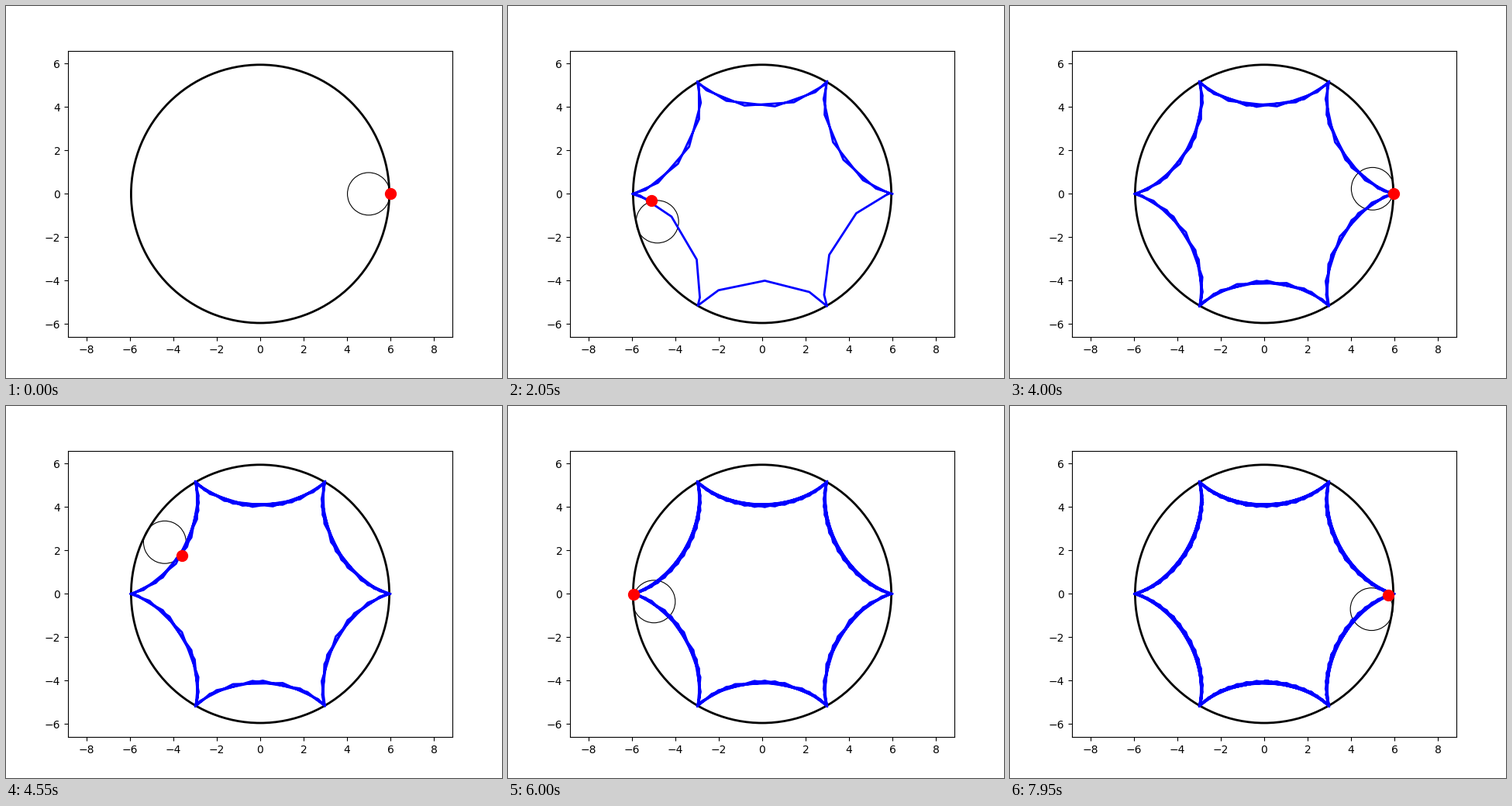
These frames come from a looping animation (640x480 px, 8 s). A matplotlib script:

```python
import numpy as np
import matplotlib.pyplot as plt
from matplotlib.animation import FuncAnimation
from matplotlib.patches import Wedge

R, r = 6, 1
FRAMES, INTERVAL = 160, 50
STEP = 30 * np.pi / 399

t = STEP * np.arange(FRAMES)
cx, cy = (R - r) * np.cos(t), (R - r) * np.sin(t)
spin = (R - r) / r * t
x, y = cx + r * np.cos(spin), cy - r * np.sin(spin)

fig, ax = plt.subplots(figsize=(6.4, 4.8), dpi=100)


def ring(center, radius, width):
    return ax.add_patch(Wedge(center, radius, 0, 360, width=width, fc="k"))


ring((0, 0), R, 0.1)
roller = ring((cx[0], cy[0]), r, 0.04)
trail, = ax.plot([], [], "b-", lw=2)
dot, = ax.plot([], [], "ro", ms=10)

ax.set_aspect("equal", adjustable="datalim")
ax.set_xlim(-6.6 * 496 / 369.6, 6.6 * 496 / 369.6)
ax.set_ylim(-6.6, 6.6)


def draw(i):
    roller.set_center((cx[i], cy[i]))
    trail.set_data(x[:i + 1], y[:i + 1])
    dot.set_data([x[i]], [y[i]])
    return roller, trail, dot


anim = FuncAnimation(fig, draw, frames=FRAMES, interval=INTERVAL,
                     repeat=True, repeat_delay=0)
plt.show()
```
